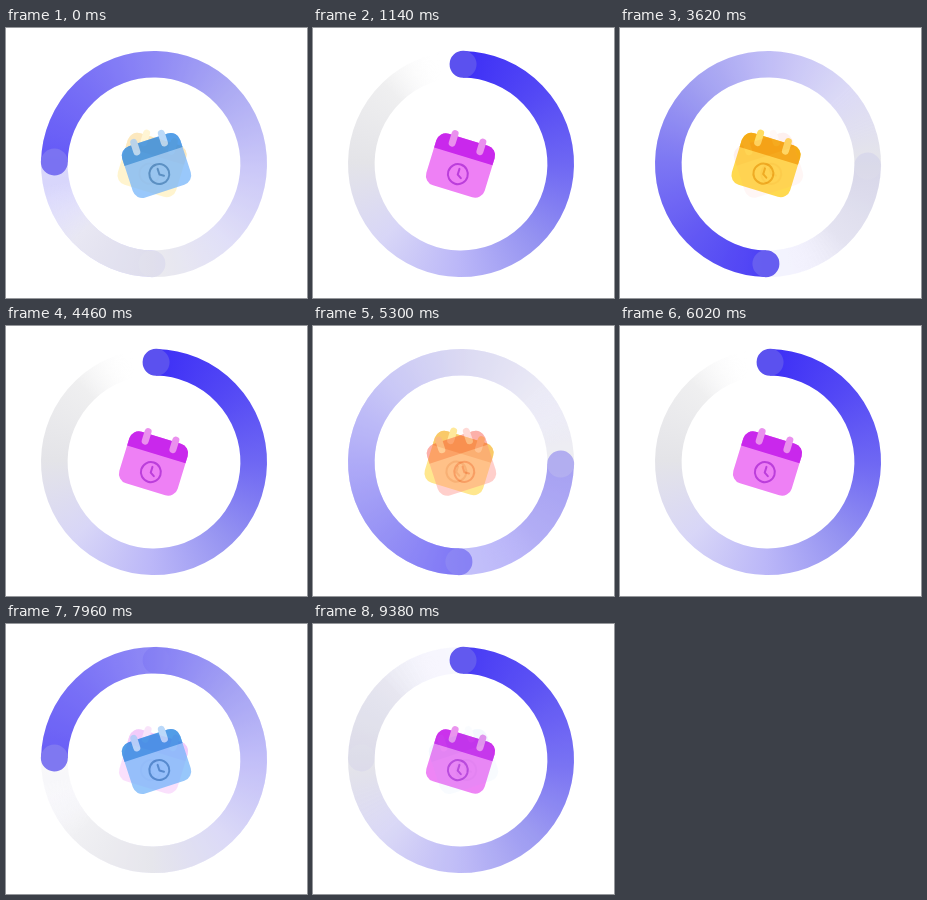
Write an HTML page with a canvas that moves like this. It is 301 px wide and 270 px high and loops after 9.4 s.

```html
<!DOCTYPE html>
<html lang="en">
<head>
<meta charset="utf-8">
<title>Calendar loader</title>
<style>
  html, body { margin: 0; width: 100%; height: 100%; overflow: hidden; background: #fff; }
  canvas { display: block; width: 301px; height: 270px; }
</style>
</head>
<body>
<canvas id="stage"></canvas>
<script>
const W = 301, H = 270, LOOP = 9400;
const CYCLE = 34.5, FADE = 5.5; // in playback steps
const CENTER = { x: 148, y: 136 }, RADIUS = 99.7, BAND = 26.6;
const TRAIL = ['#3d2ff6', '#5348f5', '#6f68f3', '#9593f1', '#bbb7f8', '#d8d6f7', '#e4e4e8', '#efeff0', '#fff0'];

// Each state starts to replace the previous one at `start` within the cycle.
const states = [
  { start: -1.1, head: 180, x: 146, y: 137, tilt: 17, body: '#ffd742', top: '#f5a505', ring: '#ffdb58', clock: '#eda80c' },
  { start: 5.7, head: 90, x: 148.5, y: 137.3, tilt: -18, body: '#ff8a80', top: '#f83e2c', ring: '#ffa59c', clock: '#f03426' },
  { start: 15.2, head: 0, x: 147.5, y: 137.5, tilt: 17, body: '#ee80f5', top: '#c928ec', ring: '#ea90ee', clock: '#bb3edb' },
  { start: 26.3, head: 270, x: 150.5, y: 137.5, tilt: -18, body: '#78b6fa', top: '#1d7fe0', ring: '#a5cdf8', clock: '#2670c0' }
];

const scale = window.devicePixelRatio || 1;
const rad = deg => deg * Math.PI / 180;

function setUp(canvas) {
  canvas.width = W * scale;
  canvas.height = H * scale;
  const ctx = canvas.getContext('2d');
  ctx.scale(scale, scale);
  return ctx;
}

function drawRing(ctx, head) {
  ctx.save();
  ctx.translate(CENTER.x, CENTER.y);
  ctx.rotate(rad(head - 88.8));
  const trail = ctx.createConicGradient(0, 0, 0);
  TRAIL.forEach((color, i) => trail.addColorStop(Math.min(i / 8, 0.965), color));
  ctx.strokeStyle = trail;
  ctx.lineWidth = BAND;
  ctx.beginPath();
  ctx.arc(0, 0, RADIUS, 0, rad(360));
  ctx.stroke();
  ctx.fillStyle = '#5b51ef';
  ctx.beginPath();
  ctx.arc(RADIUS, 0, BAND / 2 + 0.2, 0, rad(360));
  ctx.fill();
  ctx.restore();
}

function box(ctx, x, y, w, h, r, color) {
  ctx.fillStyle = color;
  ctx.beginPath();
  ctx.roundRect(x, y, w, h, r);
  ctx.fill();
}

function drawCalendar(ctx, s) {
  ctx.save();
  ctx.translate(s.x, s.y);
  ctx.rotate(rad(s.tilt));
  box(ctx, -30.5, -27, 61, 54, 10, s.body);
  box(ctx, -30.5, -27, 61, 17.5, [10, 10, 0, 0], s.top);
  for (const x of [-14.5, 14.5]) box(ctx, x - 3.5, -32.5, 7, 17, 3.5, s.ring);
  ctx.strokeStyle = s.clock;
  ctx.lineWidth = 2;
  ctx.lineCap = ctx.lineJoin = 'round';
  ctx.beginPath();
  ctx.arc(0, 9, 10, 0, rad(360));
  ctx.moveTo(0, 3.5);
  ctx.lineTo(0, 9.5);
  ctx.lineTo(4, 12);
  ctx.stroke();
  ctx.restore();
}

function makeLayer(state) {
  const canvas = document.createElement('canvas');
  const ctx = setUp(canvas);
  drawRing(ctx, state.head);
  drawCalendar(ctx, state);
  return canvas;
}

// Playback advances unevenly: a 100 ms hold, then two 20 ms steps.
function stepAt(t) {
  if (t < 160) return t < 140 ? 0 : 1;
  const part = (t - 160) % 140;
  const turn = Math.floor((t - 160) / 140);
  return 2 + 3 * turn + (part < 100 ? 0 : part < 120 ? 1 : 2);
}

const easeOut = x => 1 - Math.pow(1 - x, 1.3);
const layers = states.map(makeLayer);
const stage = setUp(document.getElementById('stage'));

function draw(t) {
  const first = states[0].start;
  const step = (stepAt(t) - first) % CYCLE + first;
  const current = states.findLastIndex(s => s.start <= step);
  const previous = (current + 3) % 4;
  const shown = easeOut(Math.min(1, (step - states[current].start) / FADE));

  stage.globalAlpha = 1;
  stage.fillStyle = '#fff';
  stage.fillRect(0, 0, W, H);
  // Upright-leaning pairs stack with the counter-tilted calendars on top.
  for (const i of [2, 0, 1, 3]) {
    stage.globalAlpha = i === current ? shown : i === previous ? 1 - shown : 0;
    stage.drawImage(layers[i], 0, 0, W, H);
  }
}

function tick() {
  draw(performance.now() % LOOP);
  requestAnimationFrame(tick);
}
tick();
</script>
</body>
</html>
```
